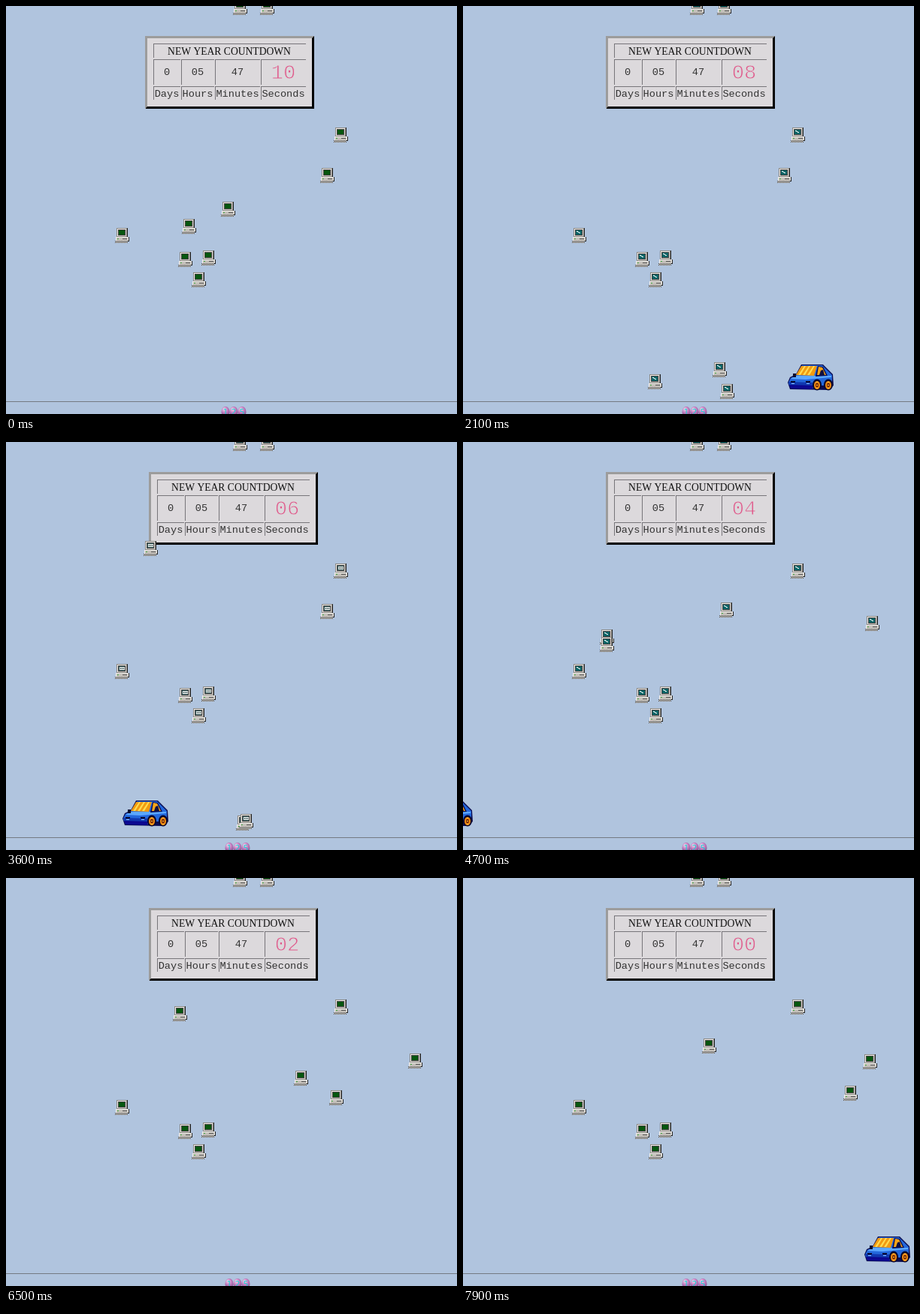
Write an HTML page with a canvas that moves like this. It is 600 px wide and 544 px high and loops after 8000 ms.

```html
<!DOCTYPE html>
<html lang="en">
<head>
<meta charset="utf-8">
<title>New Year Countdown</title>
<style>
html, body { margin: 0; width: 100%; height: 100%; overflow: hidden; background: #b0c4de; }
canvas { display: block; }
</style>
</head>
<body>
<canvas id="stage" width="600" height="544"></canvas>
<script>
const ctx = document.getElementById('stage').getContext('2d');
const LOOP = 8000, STEP = 100;
const SKY = '#b0c4de', PAPER = '#dcd9dc', INK = '#222';
const SERIF = '"Liberation Serif", serif';
const MONO = '"Liberation Mono", monospace';

// Icons at rest, by centre
const still = [[311, 2], [347, 2], [445, 172], [154, 306], [238, 338], [269, 336], [256, 365]];

// Key points of the wandering icons; a shorter list joins at a later knot
const knots = [0, 1400, 2800, 3600, 4700, 6500, 7900];
const dragged = [[295, 271], [287, 483], [388, 467], [319, 506], [191, 270], [231, 181], [327, 224]];
const partner = [[243, 294], [122, 510], [400, 469], [315, 508], [191, 260], [392, 267], [515, 287]];
const thrown = [...dragged.slice(0, 3), [192, 142], [544, 242], [544, 244], [541, 245]];
const late = [[427, 226], [350, 224], [439, 293], [541, 245]];

function rect(color, x, y, w, h) {
  ctx.fillStyle = color;
  ctx.fillRect(x, y, w, h);
}

function poly(color, ...p) {
  ctx.fillStyle = color;
  ctx.beginPath();
  for (let i = 0; i < p.length; i += 2) ctx.lineTo(p[i], p[i + 1]);
  ctx.closePath();
  ctx.fill();
}

function oval(color, x, y, rx, ry) {
  ctx.fillStyle = color;
  ctx.beginPath();
  ctx.ellipse(x, y, rx, ry, 0, 0, Math.PI * 2);
  ctx.fill();
}

function text(str, x, y, size, font, color) {
  ctx.font = size + 'px ' + font;
  ctx.textAlign = 'center';
  ctx.fillStyle = color;
  ctx.fillText(str, x, y);
}

function at(x, y, paint) {
  ctx.save();
  ctx.translate(x, y);
  paint();
  ctx.restore();
}

// Smooth curve through the key points
function follow(points, t) {
  const times = knots.slice(-points.length), last = points.length - 1;
  if (t <= times[0]) return points[0];
  let i = 0;
  while (i < last - 1 && t >= times[i + 1]) i++;
  const span = times[i + 1] - times[i], u = (t - times[i]) / span;
  const slope = (k, axis) => {
    const a = Math.max(0, k - 1), b = Math.min(last, k + 1);
    return (points[b][axis] - points[a][axis]) / (times[b] - times[a]) * span;
  };
  const ease = u * u * (3 - 2 * u);
  return [0, 1].map(axis => Math.round(
    points[i][axis] + (points[i + 1][axis] - points[i][axis]) * ease +
    u * (1 - u) * ((1 - u) * slope(i, axis) - u * slope(i + 1, axis))));
}

const pictures = {
  green() { rect('#07560f', 5, 3, 8, 6); },
  dialog() {
    rect('#31585a', 5, 3, 8, 6);
    rect('#e4e8e6', 6, 4, 7, 4);
    for (let x = 7; x < 12; x += 2) rect('#3c5a5c', x, 5, 1, 2);
  },
  drawing() {
    rect('#0c6466', 5, 3, 8, 6);
    for (let i = 0; i < 3; i++) rect('#e8f4f2', 6 + i * 1.5, 4 + i, 2, 1);
  }
};

function computer([cx, cy], picture) {
  at(cx - 9, cy - 10, () => {
    rect(INK, 3, 0, 14, 13);
    rect('#8c8984', 2, 0, 14, 12);
    rect('#f4f2ee', 3, 1, 12, 10);
    rect('#d0ccc6', 4, 2, 11, 9);
    rect('#444', 4, 2, 10, 8);
    pictures[picture]();
    rect(INK, 2, 12, 17, 6);
    rect('#f0eeea', 1, 12, 17, 5);
    rect('#c4c0ba', 2, 13, 15, 4);
    rect('#555', 10, 14, 6, 1);
    rect('#4a4', 3, 14, 2, 1);
    for (let row = 0; row < 3; row++) {
      rect('#e4e0da', 1 - row / 2, 17 + row, 16, 1);
      for (let x = row % 2; x < 17; x += 2) rect('#444', x, 17 + row, 1, 1);
    }
  });
}

function cell(x, y, w, h) {
  rect('#77757a', x, y, w, 1);
  rect('#77757a', x, y, 1, h);
}

function panel(seconds) {
  rect('#000', 186, 40, 224, 97);
  poly('#9c9c9c', 185, 40, 410, 40, 407, 43, 188, 134, 185, 137);
  rect(PAPER, 188, 43, 219, 91);
  cell(196, 50, 203, 19);
  text('NEW YEAR COUNTDOWN', 297, 64.5, 13.6, SERIF, '#111');
  const columns = { Days: '0', Hours: '05', Minutes: '47', Seconds: seconds };
  let x = 196;
  for (const [label, value] of Object.entries(columns)) {
    const w = Math.round(label.length * 8.16) + 3, mid = x + w / 2;
    cell(x, 71, w, 34);
    cell(x, 107, w, 18);
    text(label, mid, 121, 13.6, MONO, '#333');
    if (label === 'Seconds') {
      text(value, mid, 96.5, 27.2, MONO, '#e0588a');
      // slim the strokes of the big digits
      ctx.strokeStyle = PAPER;
      ctx.lineWidth = 0.9;
      ctx.strokeText(value, mid, 96.5);
    } else {
      text(value, mid, 92, 13.6, MONO, '#333');
    }
    x += w + 1;
  }
}

function counter(x) {
  [...'125'].forEach((digit, i) => {
    const mid = x + 5 + i * 11;
    const shine = ctx.createRadialGradient(mid - 2, 537, 0, mid, 540, 8);
    shine.addColorStop(0, '#f4e4f4');
    shine.addColorStop(0.5, '#c47cc0');
    shine.addColorStop(1, '#6a4a80');
    oval(shine, mid, 541, 5.5, 7);
    text(digit, mid, 545, 11, '"DejaVu Sans", sans-serif', '#18d4d4');
  });
}

function wheel(x) {
  oval('#08062c', x, 27, 6, 7.5);
  oval('#f08a10', x, 27.5, 4, 5.5);
  oval('#7a2c08', x, 27.5, 2, 3);
  for (let y = 23; y < 33; y += 4) rect('#ffc840', x - 1, y, 2, 1);
}

function car(x) {
  at(x, 478, () => {
    poly('#0a0c50', 0, 24, 3, 17, 11, 13, 18, 0, 47, 0, 60, 13, 61, 28, 54, 34, 3, 33);
    poly('#2468dc', 1, 24, 4, 18, 12, 14, 19, 1, 46, 1, 59, 14, 59, 28, 2, 28);
    poly('#5ca8ff', 4, 19, 11, 15, 58, 15, 58, 17, 24, 20);
    poly('#1038b0', 1, 23, 33, 24, 34, 32, 4, 31);
    poly('#0c0890', 2, 27, 33, 28, 33, 33, 4, 32);
    poly('#f29a10', 18, 2, 39, 2, 35, 15, 11, 14);
    for (let i = 0; i < 3; i++) {
      const left = 22 + i * 6;
      poly('#ffdc50', left, 2, left + 2, 2, left - 5, 14, left - 8, 14);
    }
    poly('#0a0c50', 40, 2, 47, 3, 53, 15, 37, 16);
    poly('#f6a418', 41, 3, 46, 4, 51, 14, 39, 14);
    poly('#101040', 44, 8, 47, 7, 49, 14, 42, 14);
    rect('#0a0a30', 7, 12, 4, 5);
    for (const lamp of [4, 24]) {
      rect('#0a0a30', lamp, 22, 6, 2);
      rect('#8cc4ff', lamp + 1, 25, 4, 1);
    }
    wheel(39);
    wheel(54);
  });
}

function pointer(x, y) {
  at(x, y, () => {
    poly(INK, 0, 0, 0, 13, 3, 10, 6, 16, 8, 15, 5.5, 9.5, 9, 9);
    poly('#fff', 1, 2.4, 1, 11, 3.3, 8.5, 6.3, 14.6, 4.2, 8.6, 7, 8.4);
  });
}

function pictureAt(t) {
  if (t < 800 || t >= 5600) return 'green';
  return Math.floor(t / 1000) % 2 ? 'dialog' : 'drawing';
}

function draw(t) {
  const shift = t < 500 ? 0 : 5;
  const left = Math.max(0, 10 - Math.floor(t * 0.00123 + 0.4));
  const picture = pictureAt(t);
  rect(SKY, 0, 0, 600, 544);
  rect('#747a82', 0, 527, 600, 1);
  counter(287 + shift);
  at(shift, 0, () => panel(String(left).padStart(2, '0')));
  // the car crosses, then comes round again
  const lap = t < 7000 ? 1190 : 7900 - 360;
  car(Math.round(600 - (t - lap) * 0.1845));
  still.forEach(p => computer(p, picture));
  [late, thrown, partner, dragged].forEach(path => computer(follow(path, t), picture));
  if (t >= 1200 && t < 1800) {
    const [x, y] = follow(dragged, t);
    pointer(x - 11, y - 19);
  }
}

function tick() {
  draw(Math.floor(performance.now() % LOOP / STEP) * STEP);
  requestAnimationFrame(tick);
}
tick();
</script>
</body>
</html>
```
